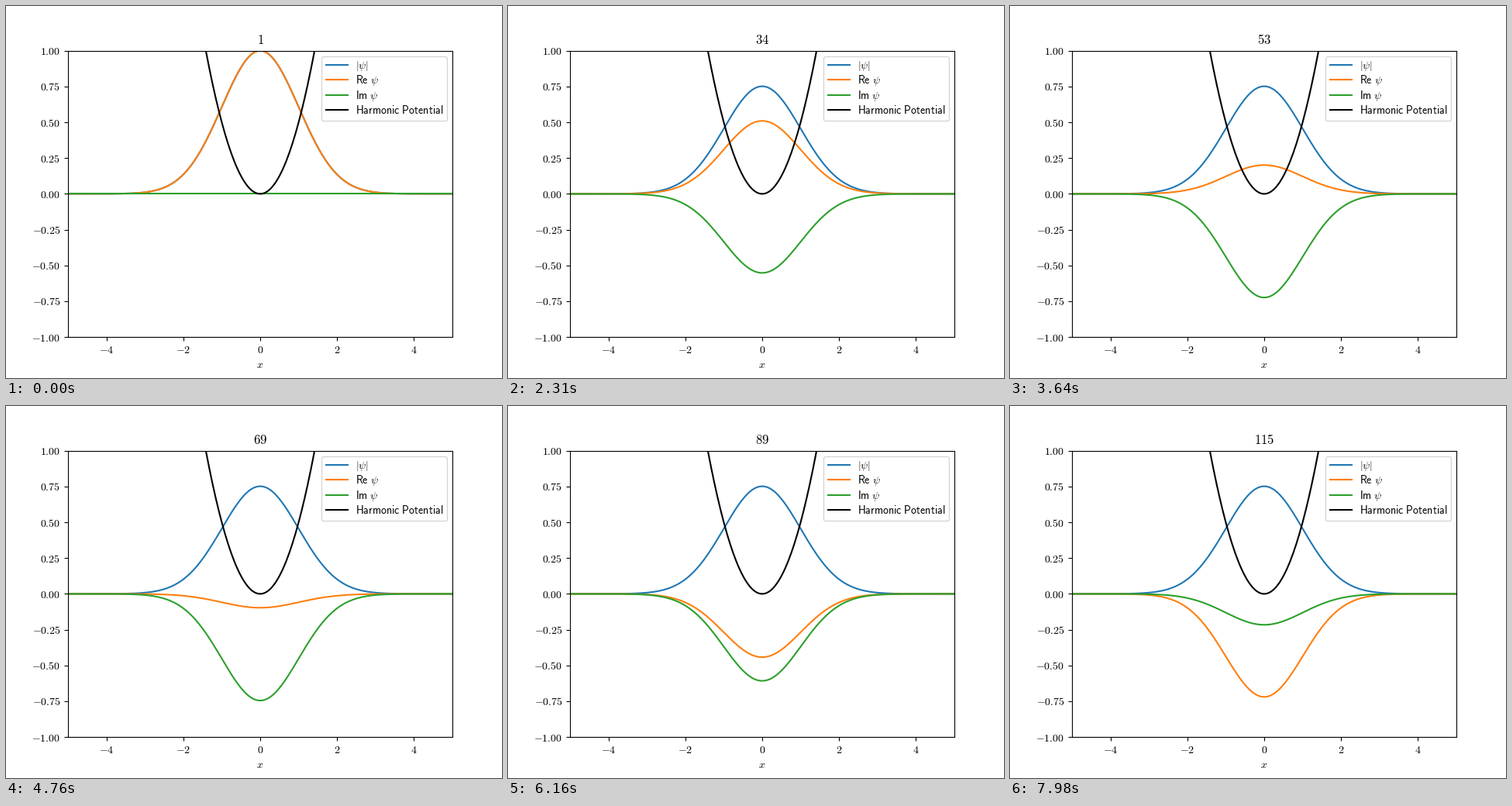
Animation, 640 px wide and 480 px high, one loop 8000 ms. Source, as a matplotlib script:

```python
import numpy as np
import matplotlib.pyplot as plt
from matplotlib.animation import FuncAnimation
from matplotlib.lines import Line2D
from matplotlib.patches import FancyBboxPatch

LOOP_MS, TICK_MS, STEP_MS = 8000, 20, 70
DT = 0.05      # time step; the ground state energy is 1/2
W, H, DPI = 640, 480, 100

plt.rcParams["mathtext.fontset"] = "cm"

x = np.linspace(-10, 10, 501)
bump = np.exp(-x**2 / 2)
ground = bump / np.pi**0.25

fig = plt.figure(figsize=(W / DPI, H / DPI), dpi=DPI)
ax = fig.add_subplot()
ax.set_xlim(-5, 5)
ax.set_ylim(-1, 1)

xticks = np.arange(-4, 5, 2)
yticks = np.linspace(-1, 1, 9)
ax.set_xticks(xticks, [f"${v}$" for v in xticks])
ax.set_yticks(yticks, [f"${v:.2f}$" for v in yticks])
ax.set_xlabel("$x$")
title = ax.set_title("")

colors = ["C0", "C1", "C2", "black"]
labels = [r"$|\psi|$", r"$\mathsf{Re}\ \psi$", r"$\mathsf{Im}\ \psi$",
          r"$\mathsf{Harmonic\ Potential}$"]
mod_line, re_line, im_line, _ = [ax.plot(x, x**2 / 2, color=c)[0]
                                 for c in colors]


def draw_legend():
    """Key in the upper right corner, laid out in pixels from the bottom."""
    box = FancyBboxPatch((407, H - 148.4), 162, 83, transform=None,
                         boxstyle="round,pad=0,rounding_size=2.8",
                         fc="white", ec="0.8", lw=1, alpha=0.8, zorder=5,
                         snap=True)
    ax.add_artist(box)
    for i, (color, label) in enumerate(zip(colors, labels)):
        y = H - 76 - 19.4 * i
        ax.add_artist(Line2D([412.7, 440.5], [y, y], color=color,
                             transform=None, zorder=6))
        ax.text(451.2, y - 4.9, label, transform=None, zorder=6,
                va="baseline")


draw_legend()


def update(k):
    step = int((k + 0.5) * TICK_MS // STEP_MS)
    psi = (ground if step else bump) * np.exp(-0.5j * DT * step)
    mod_line.set_ydata(abs(psi))
    re_line.set_ydata(psi.real)
    im_line.set_ydata(psi.imag)
    title.set_text(rf"$\mathsf{{{step + 1}}}$")
    return mod_line, re_line, im_line, title


anim = FuncAnimation(fig, update, frames=LOOP_MS // TICK_MS,
                     interval=TICK_MS, repeat=True, repeat_delay=0)
plt.show()
```
